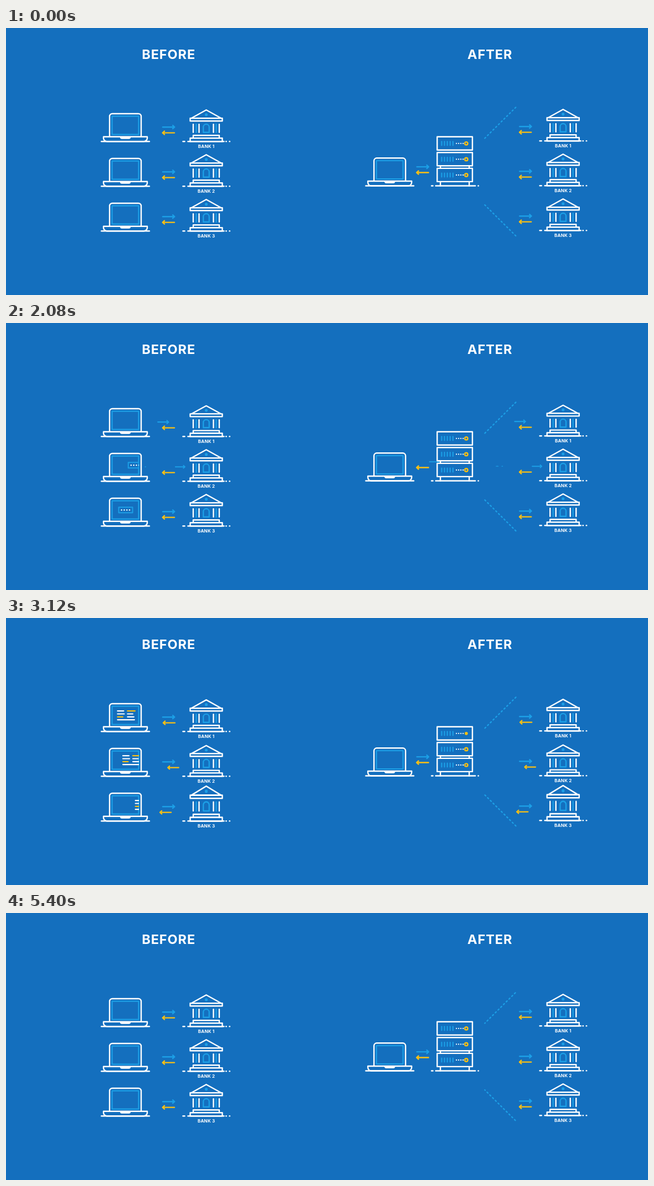
These frames come from a looping animation (1159 px wide and 483 px high, 5.44 s). An HTML page with a canvas:

```html
<!DOCTYPE html>
<html lang="en">
<head>
<meta charset="utf-8">
<title>Before and after</title>
<style>
html, body { margin: 0; width: 100%; height: 100%; overflow: hidden; background: #146fbe; }
canvas { display: block; width: 1159px; height: 483px; }
</style>
</head>
<body>
<canvas id="stage"></canvas>
<script>
const W = 1159, H = 483, LOOP = 5440, STEP = 40, STAGGER = 250;
const BG = '#146fbe', WHITE = '#fff', BLUE = '#1c9fe6', GOLD = '#fbc012';
const canvas = document.getElementById('stage');
const ctx = canvas.getContext('2d');
const ratio = window.devicePixelRatio || 1;
canvas.width = W * ratio;
canvas.height = H * ratio;

const part = (t, from, to) => Math.min(1, Math.max(0, (t - from) / (to - from)));
const backIn = p => 2.7 * p ** 3 - 1.7 * p * p;
const backOut = p => 1 - backIn(1 - p);

function at(x, y, draw) {
  ctx.save();
  ctx.translate(x, y);
  draw();
  ctx.restore();
}

function pen(color, width) {
  ctx.strokeStyle = color;
  ctx.lineWidth = width;
}

function line(...pts) {
  ctx.beginPath();
  for (let i = 0; i < pts.length; i += 2) ctx.lineTo(pts[i], pts[i + 1]);
  ctx.stroke();
}

function box(x, y, w, h) {
  ctx.fillStyle = BG;
  ctx.fillRect(x, y, w, h);
  ctx.strokeRect(x, y, w, h);
}

function dot(x, y, r, color) {
  ctx.fillStyle = color;
  ctx.beginPath();
  ctx.arc(x, y, r, 0, Math.PI * 2);
  ctx.fill();
}

function label(text, x, y, size, gap) {
  ctx.font = `bold ${size}px Inter, sans-serif`;
  ctx.letterSpacing = gap + 'px';
  ctx.textAlign = 'center';
  ctx.fillStyle = WHITE;
  ctx.fillText(text, x + gap / 2, y);
}

// Login field: pops in, fills with four dots, leaves to the right.
function field(t) {
  if (t <= 0 || t >= 1880) return;
  const scale = backOut(part(t, 0, 320));
  at(1.5 + 36 * backIn(part(t, 1530, 1880)), -29, () => {
    ctx.scale(scale, scale);
    pen(BLUE, 2);
    ctx.strokeRect(-12.5, -5, 25, 10);
    for (let i = 0; i < 4; i++) {
      if (t >= 520 + 250 * i) dot(-7.4 + 4.8 * i, 0, 1.2, WHITE);
    }
  });
}

// Start x, end x, line number and colour of each stroke of the listing.
const CODE = [
  [-14.5, -3.5, 0, WHITE], [3.5, 17, 0, GOLD],
  [-14.5, -2.5, 1, WHITE], [3.5, 13, 1, WHITE],
  [-14.5, -5, 2, GOLD], [3.5, 15, 2, WHITE],
  [-14.5, 16, 3, WHITE]
];

function code(t) {
  if (t < 2560) return;
  const shift = 40 * (1 - part(t, 2560, 3180)) ** 2;
  CODE.forEach(([from, to, row, color], i) => {
    const start = 4080 + 68 * i, y = -37 + 5.3 * row;
    const gone = part(t, start, start + 75);
    if (gone === 1) return;
    pen(color, 2.2);
    line(from + (to - from) * gone + shift, y, to + shift, y);
  });
}

function laptop(x, y, fieldTime, codeTime) {
  at(x, y, () => {
    pen(WHITE, 2.4);
    ctx.fillStyle = BG;
    ctx.beginPath();
    ctx.moveTo(-28.5, -9);
    ctx.arcTo(-28.5, -50.2, 0, -50.2, 5);
    ctx.arcTo(28.5, -50.2, 28.5, -9, 5);
    ctx.lineTo(28.5, -9);
    ctx.fill();
    ctx.stroke();
    pen(BLUE, 2.2);
    ctx.strokeRect(-24, -45.5, 48, 33);
    ctx.save();
    ctx.beginPath();
    ctx.rect(-24.5, -45, 49, 32);
    ctx.clip();
    field(fieldTime);
    code(codeTime);
    ctx.restore();
    pen(WHITE, 2.4);
    ctx.fillStyle = BG;
    ctx.beginPath();
    ctx.moveTo(-39.5, -8.5);
    ctx.lineTo(39.5, -8.5);
    ctx.arcTo(39.5, 0, 33, 0, 6);
    ctx.lineTo(-33, 0);
    ctx.arcTo(-39.5, 0, -39.5, -8.5, 6);
    ctx.closePath();
    ctx.fill();
    ctx.stroke();
    line(-43.3, 0, 43.3, 0);
    ctx.fillStyle = WHITE;
    ctx.beginPath();
    ctx.moveTo(-10, -8.5);
    ctx.lineTo(10, -8.5);
    ctx.arcTo(9, -4.5, 6, -4.5, 3);
    ctx.lineTo(-6, -4.5);
    ctx.arcTo(-9, -4.5, -10, -8.5, 3);
    ctx.fill();
  });
}

function wobble(u) {
  if (u < 0 || u > 600) return 0;
  return 11.5 * Math.exp(-u / 150) * Math.sin(u * Math.PI / 200);
}

function bank(x, y, number, t) {
  const grow = wobble(t - 1830) + wobble(t - 2560);
  label('BANK ' + number, x, y + 11.8, 8, 0.2);
  at(x, y, () => {
    ctx.save();
    ctx.scale(1, 1 + grow / 57);
    pen(WHITE, 2.4);
    ctx.fillStyle = BG;
    ctx.fillRect(-26, -37, 52, 26);
    ctx.beginPath();
    ctx.moveTo(-27, -42);
    ctx.lineTo(0, -57);
    ctx.lineTo(27, -42);
    ctx.closePath();
    ctx.fill();
    ctx.stroke();
    box(-29, -42, 58, 5);
    dot(0, -48.5, 2.6, BLUE);
    for (const side of [-1, 1]) {
      pen(WHITE, 2.4);
      line(side * 23.5, -31, side * 23.5, -16.5);
      line(side * 13, -31, side * 13, -16.5);
      pen(BLUE, 2.4);
      line(side * 18, -31, side * 18, -16.5);
    }
    ctx.beginPath();
    ctx.moveTo(-5.3, -16.5);
    ctx.lineTo(-5.3, -26);
    ctx.arc(0, -26, 5.3, Math.PI, 0);
    ctx.lineTo(5.3, -16.5);
    ctx.closePath();
    ctx.stroke();
    pen(WHITE, 2.4);
    box(-23.5, -11, 47, 5);
    box(-29, -6, 58, 6);
    ctx.restore();
    pen(WHITE, 2.4);
    line(-42, 0, -39, 0);
    line(-33, 0, 32, 0);
    line(35.8, 0, 36.2, 0);
    line(42, 0, 42.4, 0);
  });
}

// Centre shift is measured along the pointing direction.
function arrow(x, y, dir, color, shift, alpha) {
  const scale = 1 - Math.abs(shift) / 105;
  at(x + dir * shift, y, () => {
    ctx.scale(dir * scale, scale);
    ctx.globalAlpha = alpha;
    pen(color, 2.4);
    if (scale < 0.7) {
      line(-10.5, 0, -4, 0);
      line(8, 0, 10.5, 0);
      return;
    }
    line(-10.5, 0, 10.5, 0);
    line(7.5, -3, 10.7, 0, 7.5, 3);
  });
}

function flight(x, y, dir, color, t, leave, gone, enter, ease) {
  const out = part(t, leave, gone);
  if (out < 1) arrow(x, y, dir, color, 36 * out * out, 1 - part(out, 0.85, 1));
  if (t >= enter) arrow(x, y, dir, color, -52 * ease(t - enter), 1);
}

const blueEase = u => (1 - part(u, 0, 380)) ** 1.25;
const goldEase = u => u < 700 ? Math.exp(-u / 117) : 0;

function arrows(x, y, blueTime, goldTime) {
  flight(x, y, 1, BLUE, blueTime, 1640, 1890, 1800, blueEase);
  flight(x, y + 10.4, -1, GOLD, goldTime, 2505, 2805, 2660, goldEase);
}

// Blink window, moment of full light and period of each lamp.
const LAMPS = [
  [2140, 3540, 2560, 280],
  [2308, 3508, 2508, 400],
  [2360, 3560, 2560, 400]
];

function server(x, y, t) {
  at(x, y, () => {
    pen(WHITE, 2.4);
    for (const side of [-1, 1]) line(side * 26, -60, side * 26, 0);
    LAMPS.forEach(([from, to, zero, period], i) => {
      const top = -88.8 + 28.6 * i, mid = top + 12.1;
      pen(WHITE, 2.4);
      box(-31.8, top, 63.6, 24);
      pen(BLUE, 2.2);
      for (let k = 0; k < 5; k++) {
        const bx = -23.7 + 5.1 * k;
        line(bx, mid - 3.5, bx, mid + 3.5);
      }
      for (let k = 0; k < 4; k++) dot(3 + 4 * k, mid, 1.15, WHITE);
      const open = t < from || t > to ? 1 : Math.abs(Math.sin(Math.PI * (t - zero) / period));
      dot(20.7, mid, 2.9 + open, GOLD);
      dot(20.7, mid, 1.5 * open, BG);
    });
    pen(WHITE, 2.4);
    line(-42, 0, -39.5, 0);
    line(-34.5, 0, 37, 0);
    line(42.3, 0, 42.7, 0);
  });
}

function dashes(t) {
  const period = 7;
  ctx.save();
  pen(BLUE, 2.3);
  ctx.setLineDash([2.2, period - 2.2]);
  ctx.lineDashOffset = -period * 21 * t / LOOP;
  line(864.3, 199.5, 922.3, 141.5);
  line(864.3, 320, 922.3, 378);
  ctx.restore();
}

function draw(t) {
  ctx.setTransform(ratio, 0, 0, ratio, 0, 0);
  ctx.fillStyle = BG;
  ctx.fillRect(0, 0, W, H);
  ctx.lineCap = ctx.lineJoin = 'round';
  label('BEFORE', 293.2, 56.2, 23.5, 0.9);
  label('AFTER', 873.2, 56.2, 23.5, 0.9);
  dashes(t);
  const side = t - 3 * STAGGER;
  arrows(752.2, 251.1, t - STAGGER, side);
  for (let i = 0; i < 3; i++) {
    const local = t - STAGGER * i, y = 81 * i;
    arrows(293.5, 179.2 + y, local, local);
    arrows(937.7, 178.2 + y, local, local);
    laptop(215.5, 205.2 + y, local, local);
    bank(361.5, 205.3 + y, i + 1, local);
    bank(1005.7, 204.3 + y, i + 1, local);
  }
  laptop(692.8, 285.5, t, side);
  server(810.2, 285.5, t);
}

function tick(now) {
  draw(Math.floor(now % LOOP / STEP) * STEP);
  requestAnimationFrame(tick);
}

draw(0);
requestAnimationFrame(tick);
</script>
</body>
</html>
```
